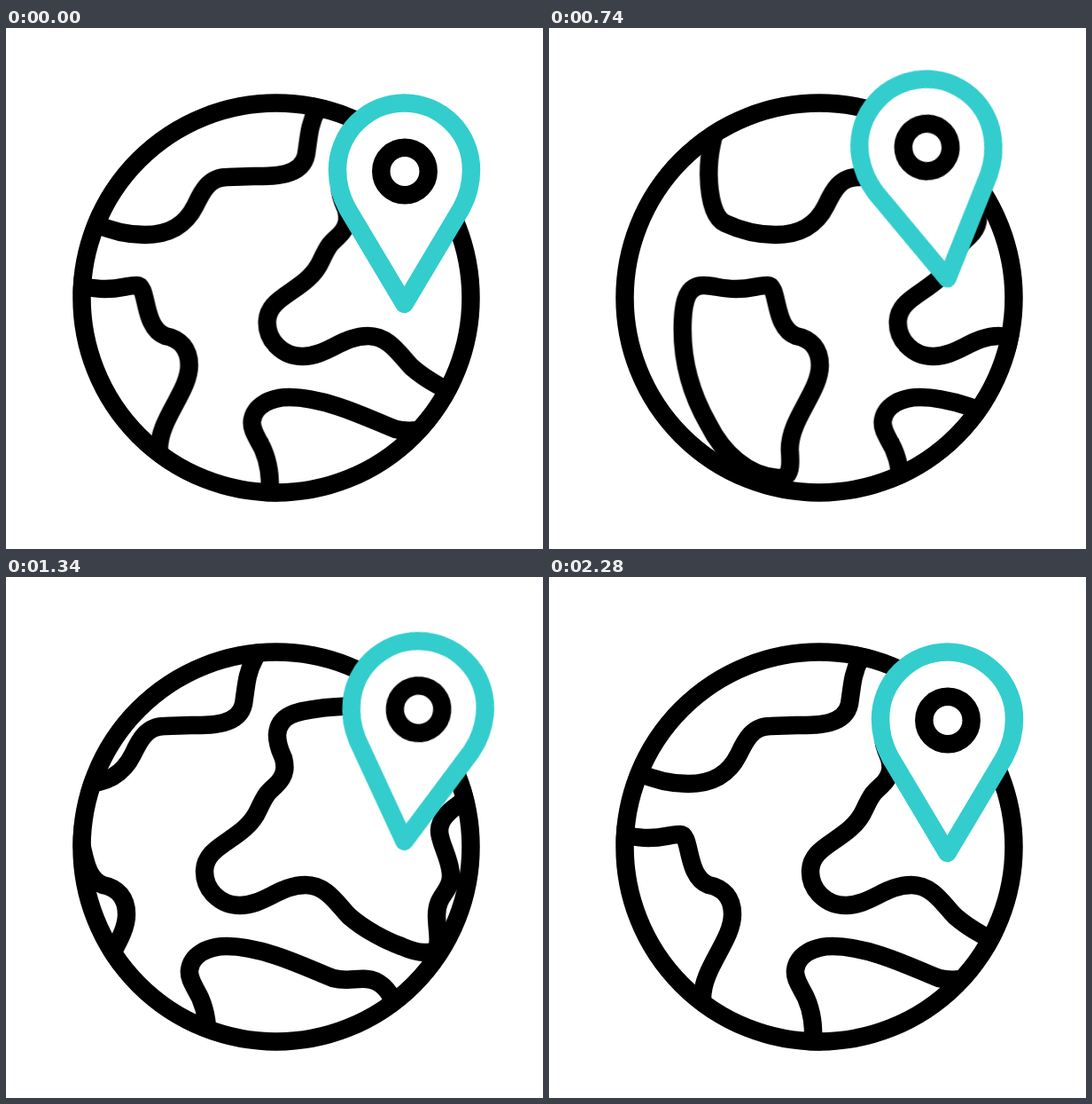
Recreate the animation shown at these times as an HTML page. Size 606 px wide and 587 px high, loop 2400 ms.

```html
<!DOCTYPE html>
<html lang="en">
<head>
<meta charset="utf-8">
<title>Globe and pin</title>
<style>
  html, body { margin: 0; width: 100%; height: 100%; overflow: hidden; background: #fff; }
  svg { display: block; width: 100%; height: 100%; --turn: 1130px; --smooth: cubic-bezier(.333, 0, .667, 1); }
  .line { fill: none; stroke: #000; stroke-width: 20.5; stroke-linejoin: round; stroke-linecap: round; }
  .drop { fill: #fff; stroke: #33cdcd; }

  #map  { animation: spin 2400ms cubic-bezier(.66, -.37, .34, 1.308) infinite; }
  #pin  { animation: hop 2400ms var(--smooth) infinite; }
  #head { animation: swing 2400ms var(--smooth) infinite; transform-origin: 449.5px 311px; }

  /* One full turn with a wind-up and an overshoot, then a rest. */
  @keyframes spin {
    0% { transform: translateX(0); }
    83.5%, 100% { transform: translateX(var(--turn)); }
  }
  @keyframes hop {
    0%, 23.5% { transform: translateY(0); }
    41.7% { transform: translateY(-80px); }
    60.8%, 100% { transform: translateY(0); }
  }
  /* Leans back in the air, then swings out around the tip. */
  @keyframes swing {
    0%, 22.5% { transform: rotate(0); }
    44.4% { transform: rotate(-27.6deg); }
    60% { transform: rotate(13deg); }
    70% { transform: rotate(-8deg); }
    80% { transform: rotate(4deg); }
    90% { transform: rotate(-1.4deg); }
    95%, 100% { transform: rotate(0); }
  }
</style>
</head>
<body>
<svg viewBox="0 0 606 587">
  <defs>
    <clipPath id="disc"><circle cx="305" cy="304" r="229.5"/></clipPath>
    <g id="land">
      <path d="M96 95 C86 122 81.5 140 81.5 165 C82 190 87 214 100 220 C115 227 135 233 157 233
               C185 233 203 222 214 200 C222 183 230 168 250 168 L280 167
               C300 167 334 168 339 143 C342 125 342 109 351 93 L355 85"/>
      <path d="M52 340 C52 305 58 290 76 290 C88 290 95 294 112 294 C130 294 137 290 148 290
               C161 290 154 337 180 347 C197 350 207 362 207 380 C207 410 173 440 173 475
               C174 490 176 507 160 507 C125 505 97 478 81 446 C61 411 52 375 52 340 Z"/>
      <path d="M298 530 C299 505 297 490 290 474 C283 460 277 453 278 443 C280 426 298 416 320 416
               C365 416 420 445 440 452 C455 456 465 452 478 453 C493 454 503 466 508 478"/>
      <path d="M546 142 C590 142 613 185 613 212 C613 230 608 238 598 245 C580 258 560 268 560 286
               C560 300 573 318 573 337 C573 355 557 358 557 381 C557 395 560 407 558 415
               C555 427 535 424 517 416 C500 410 475 397 458 382 C445 369 433 347 409 347
               C380 347 362 370 335 370 C312 370 295 352 295 332 C295 300 340 298 356 262
               C364 245 366 243 375 235 C388 223 386 212 384 204 C381 197 377 190 377 178
               C378 155 400 151 425 148 C465 143 505 146 546 142 Z"/>
    </g>
  </defs>
  <g class="line" clip-path="url(#disc)">
    <g id="map">
      <use href="#land"/>
      <use href="#land" x="-1130"/>
    </g>
  </g>
  <circle class="line" cx="305" cy="304" r="219.5"/>
  <g id="pin">
    <g id="head">
      <path class="line drop" d="M449.5 311 L385 203 C378 190 374 175 374 160
               A75.5 75.5 0 0 1 525 160 C525 175 521 190 514 203 Z"/>
      <circle class="line" cx="450" cy="161.5" r="26.7"/>
    </g>
  </g>
</svg>
</body>
</html>
```
